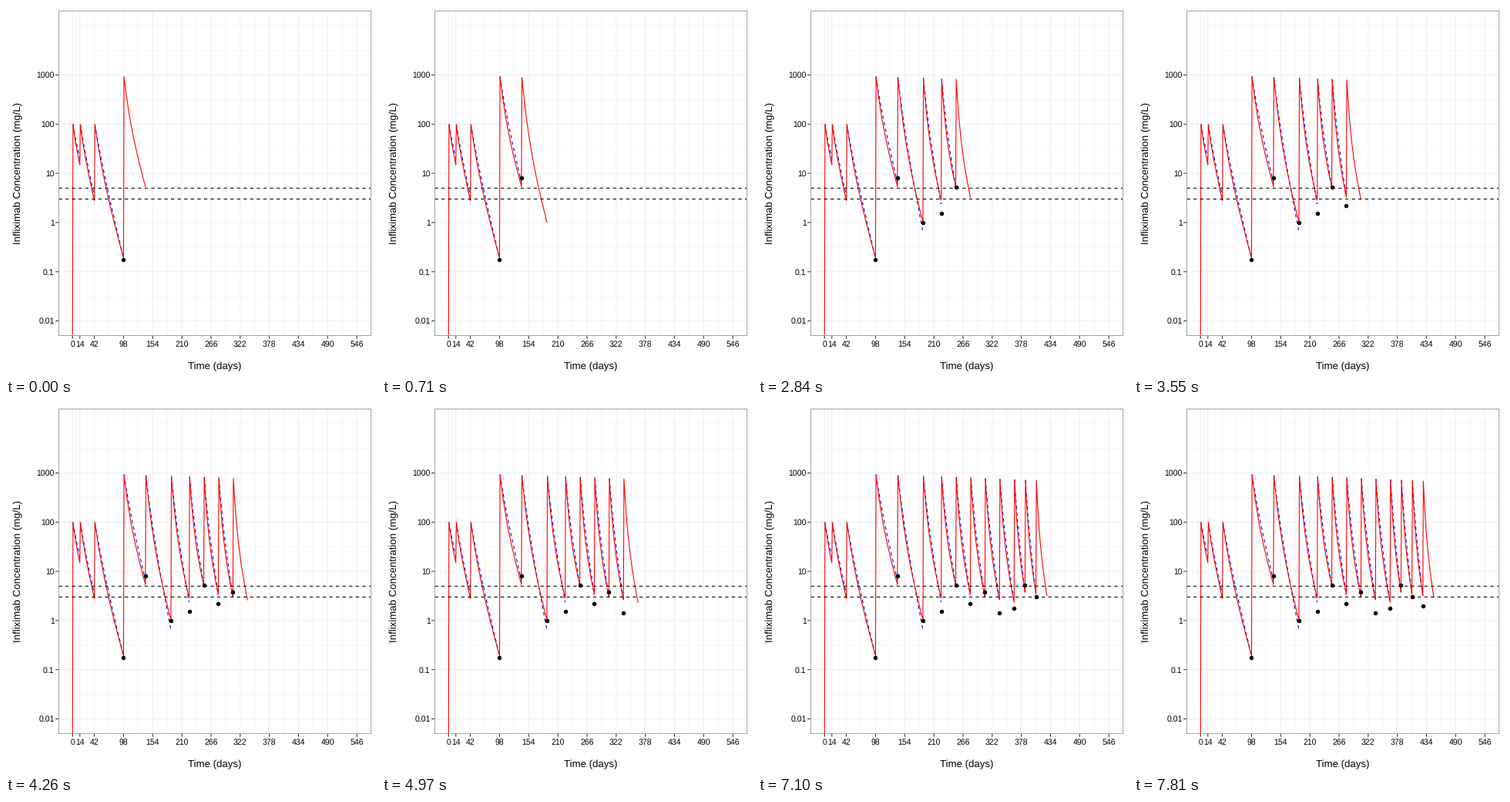
A matplotlib script for the animation above (8 s loop, 480 px wide and 480 px high).

```python
import numpy as np
import matplotlib.pyplot as plt
from matplotlib.animation import FuncAnimation
from matplotlib.patches import Rectangle

SIZE, DPI = 480, 72
TICK_MS, LOOP_MS, STEP_MS = 40, 8000, 710
LEFT, RIGHT, TOP, BOTTOM = 68.5, 473.5, 6.5, 427.5

plt.rcParams.update({"font.family": "Liberation Sans", "text.hinting": "none",
                     "path.snap": False})

# Dosing intervals shorten from eight to three weeks as clearance rises.
DOSES = np.cumsum([0, 14, 28, 56, 42, 49, 35] + [28] * 5 + [21] * 4)
SAMPLES = [0.176, 8.1, 1.01, 1.53, 5.15, 2.2, 3.85, 1.43, 1.77, 5.15, 3.0, 1.95]


def px(day):
    return 86.3 + 0.6755 * np.asarray(day, float)


def py(conc):
    return 280.9 - 63.8 * np.log10(conc)


def clearance(day):
    """Mean fall in decades per day after a dose."""
    return np.interp(day, [0, 42, 98, 140, 224, 252, 336, 364, 427],
                     [.059, .0486, .0533, .0601, .0786, .0855, .0895, .109, .1125])


def fit_error(day):
    """How far the model fit ends above the true trough, in decades."""
    return np.interp(day, [0, 42, 98, 140, 224], [.12, 0, .09, -.2, 0])


def peak(day):
    return 100 if day < 98 else 930 - 0.74 * (day - 98)


def bend(day):
    return 0.2 + 0.3 * min(day / 224, 1)


def decay(start, end, fitted):
    """Two-phase decline between two doses, in pixels."""
    u = np.linspace(0, 1, 50)
    fast = (1 - np.exp(-3 * u)) / (1 - np.exp(-3))
    drop = clearance(start) * (end - start)
    w = bend(start)
    if fitted:
        drop -= fit_error(start)
        w *= 0.5
    x = px(start + 0.9 + u * (end - start - 0.9))
    return x, py(peak(start)) + 63.8 * drop * ((1 - w) * u + w * fast)


def profile(count, fitted=False):
    xs, ys = ([], []) if fitted else ([[px(0)]], [[BOTTOM + 8]])
    for start, end in zip(DOSES[:count], DOSES[1:]):
        x, y = decay(start, end, fitted)
        xs.append(x)
        ys.append(y)
        if fitted:  # leave the rises to the solid curve
            xs.append([np.nan])
            ys.append([np.nan])
    return np.concatenate(xs), np.concatenate(ys)


fig = plt.figure(figsize=(SIZE / DPI, SIZE / DPI), dpi=DPI, facecolor="white")
ax = fig.add_axes([0, 0, 1, 1])
ax.set_xlim(0, SIZE)
ax.set_ylim(SIZE, 0)
ax.axis("off")

panel = Rectangle((LEFT, TOP), RIGHT - LEFT, BOTTOM - TOP, fill=False,
                  ec="#a3a3a3", lw=1, zorder=6)
ax.add_patch(panel)


def vline(x, **style):
    ax.plot([x, x], [TOP, BOTTOM], **{"zorder": 1, **style})


def hline(y, **style):
    ax.plot([LEFT, RIGHT], [y, y], **{"zorder": 1, **style})


minor = dict(color="#f6f6f6", lw=1)
major = dict(color="#eeeeee", lw=0.9)
days = [0, 14, 42, *range(98, 547, 56)]

for d in [-14, -7] + [(a + b) / 2 for a, b in zip(days, days[1:])]:
    vline(px(d), **minor)
for e in [*np.arange(-1.5, 4), 4]:
    hline(py(10.0 ** e), **minor)

label = dict(size=10.5, color="black", va="baseline")
tick = dict(color="#333333", lw=1.07)
for d in days:
    x = px(d)
    vline(x, **major)
    ax.plot([x, x], [BOTTOM, BOTTOM + 3.7], **tick)
    ax.text(x, 441.6, str(d), ha="center", **label)
for e in range(-2, 4):
    c = 10.0 ** e
    y = py(c)
    hline(y, **major)
    ax.plot([LEFT - 3.7, LEFT], [y, y], **tick)
    ax.text(62.6, y + 3.8, f"{c:g}", ha="right", **label)

title = dict(size=13.3, ha="center", va="baseline", rotation_mode="anchor")
ax.text(271, 470.8, "Time (days)", **title)
ax.text(19, 217, "Infliximab Concentration (mg/L)", rotation=90, **title)

dash = dict(lw=1.07, ls=(0, (4, 4)), dash_capstyle="butt")
for c in (5, 3):
    hline(py(c), color="black", **{**dash, "zorder": 5})

fit, = ax.plot([], [], color="#0000ff", zorder=2, **dash)
curve, = ax.plot([], [], color="#ff0000", lw=1.1, zorder=3,
                 solid_joinstyle="round")
dots, = ax.plot([], [], "o", color="black", ms=5.5, mew=0, zorder=4)
curve.set_clip_path(panel)


def update(i):
    step = min((i * TICK_MS + 30) // STEP_MS, 11)
    fit.set_data(*profile(step + 3, fitted=True))
    curve.set_data(*profile(step + 4))
    dots.set_data(px(DOSES[3:step + 4]), py(SAMPLES[:step + 1]))
    return fit, curve, dots


anim = FuncAnimation(fig, update, frames=LOOP_MS // TICK_MS, interval=TICK_MS,
                     repeat=True, repeat_delay=0, blit=False)
plt.show()
```
